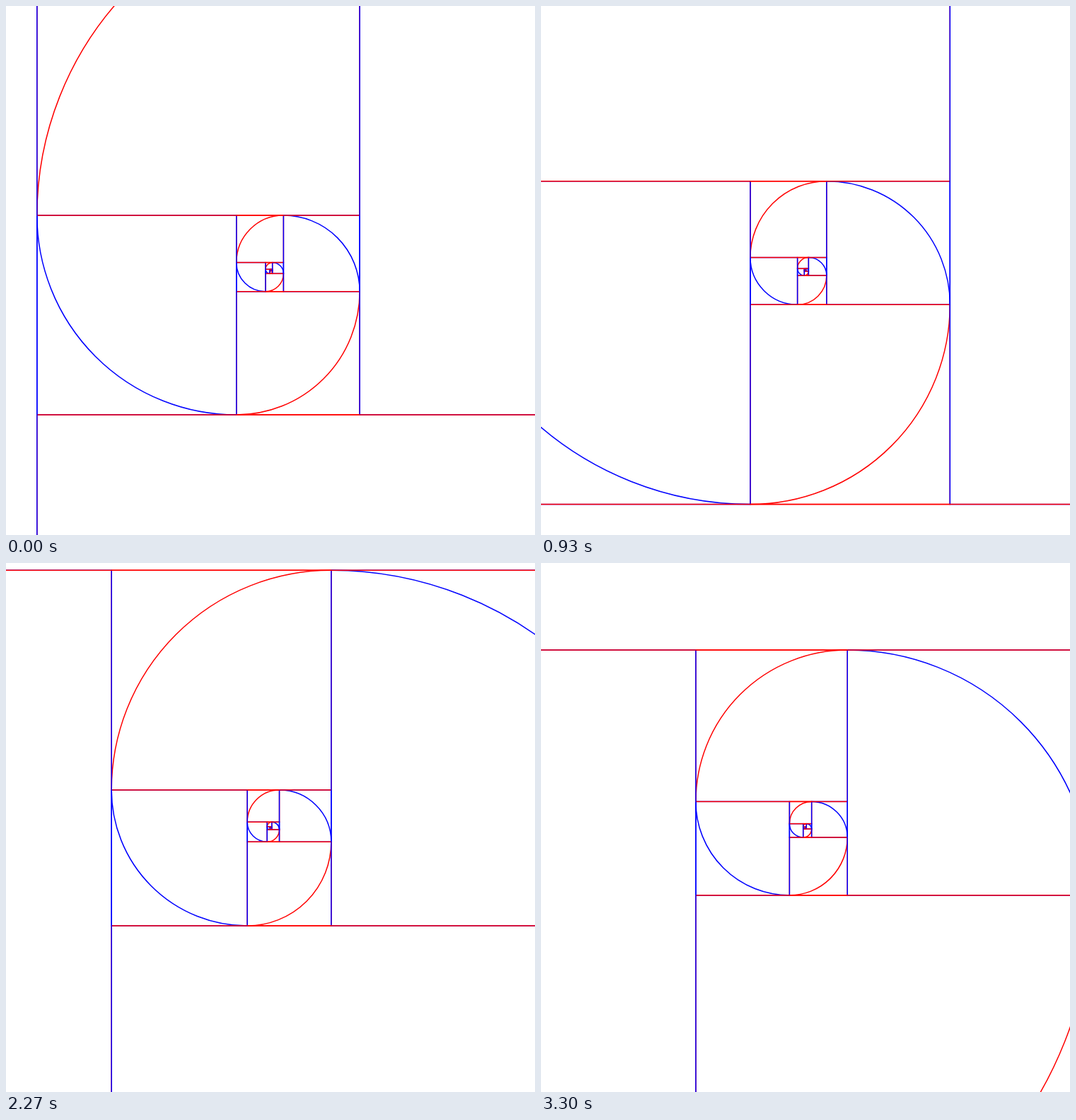
Animation, 748 px wide and 748 px high, one loop 3330 ms. Source, as an HTML page with a canvas:

```html
<!DOCTYPE html>
<html>
<head>
<meta charset="utf-8">
<title>Golden spiral zoom</title>
<style>
  html, body { margin: 0; height: 100%; overflow: hidden; background: #fff; }
  canvas { display: block; }
</style>
</head>
<body>
<canvas id="stage" width="748" height="748"></canvas>
<script>
const ctx = document.getElementById('stage').getContext('2d');
const PHI = (1 + Math.sqrt(5)) / 2;
const LOOP = 3330, STEPS = 100, CENTER = 374;
const FIRST_SIDE = 13248;

// A square with its quarter arc, placed relative to the spiral's pole.
function drawSquare(turn, side, color) {
  const x = -side * PHI ** 2 / Math.sqrt(5);
  const y = -side / (PHI * Math.sqrt(5));
  ctx.save();
  ctx.translate(CENTER, CENTER);
  ctx.rotate(turn * Math.PI / 2);
  ctx.strokeStyle = color;
  ctx.strokeRect(x, y, side, side);
  ctx.beginPath();
  ctx.arc(x + side, y, side, Math.PI / 2, Math.PI);
  ctx.stroke();
  ctx.restore();
}

function draw(time) {
  // The view widens linearly, in discrete steps on a 10 ms grid.
  const step = Math.min(STEPS - 1, Math.floor((time % LOOP + 5) * 0.03));
  const side = FIRST_SIDE / (step + 1);
  ctx.fillStyle = '#fff';
  ctx.fillRect(0, 0, 748, 748);
  ctx.lineWidth = 1.5;
  for (let k = -20; k <= 6; k++) {
    drawSquare(k, side * PHI ** k, k % 2 ? '#f00' : '#00f');
  }
}

const start = performance.now();
function tick() {
  draw(performance.now() - start);
  requestAnimationFrame(tick);
}
tick();
</script>
</body>
</html>
```
